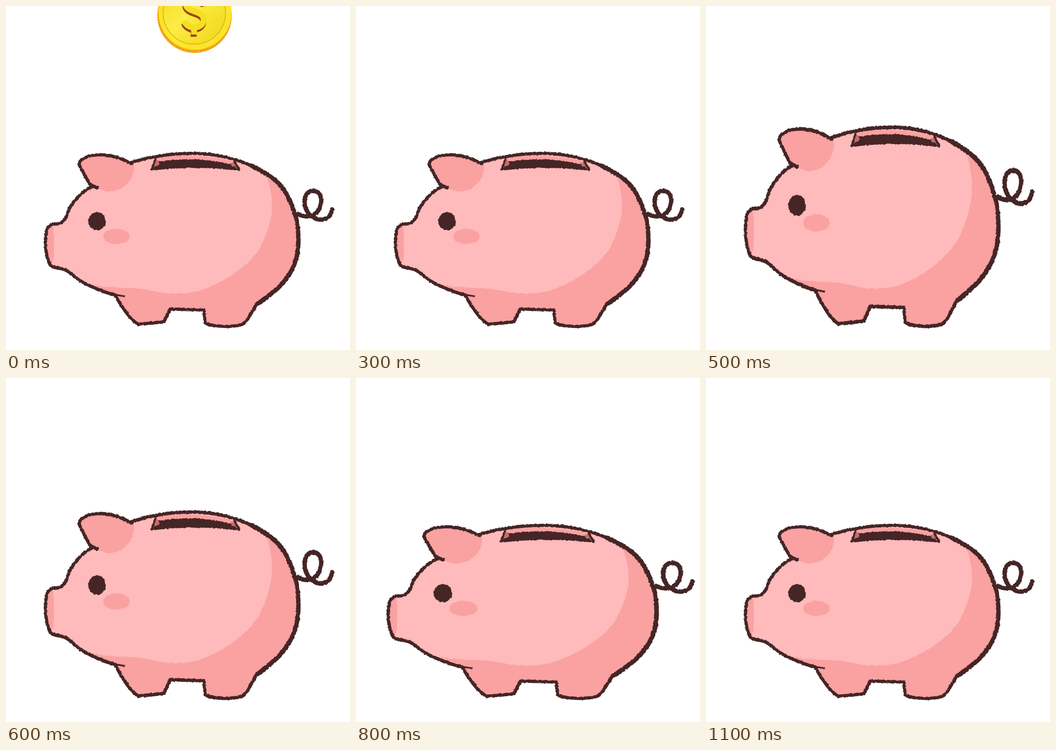
Write an HTML page that moves like this. It is 748 px wide and 748 px high and loops after 1.4 s.

```html
<!DOCTYPE html>
<html lang="en">
<head>
<meta charset="utf-8">
<title>Piggy bank</title>
<style>
  html, body { margin: 0; width: 100%; height: 100%; overflow: hidden; background: #fff; }
  svg { display: block; width: 100vw; height: 100vh; }
  .line { fill: none; stroke: #452525; stroke-width: 7; stroke-linecap: round; stroke-linejoin: round; }
  .dark { fill: #faa1a1; }
  .ink { fill: #452525; }
  .sign { fill: none; stroke-width: 13; }
</style>
</head>
<body>
<svg viewBox="0 0 748 748">
  <defs>
    <filter id="rough" filterUnits="userSpaceOnUse" x="0" y="250" width="748" height="498" color-interpolation-filters="sRGB">
      <feTurbulence type="fractalNoise" baseFrequency=".22" numOctaves="2" seed="4"/>
      <feDisplacementMap in="SourceGraphic" scale="4" xChannelSelector="R" yChannelSelector="G"/>
    </filter>
    <path id="body" d="M270 341C305 330 345 321 400 320.5C455 320 500 332 533 347C556 358 578 370 594 387C611 405 622 430 632 465C638 500 637 535 629 556C618 592 590 618 545 649C536 662 530 678 515 692C490 699 455 698 433 690L430 661L357 659L343 687L287 692C267 679 249 650 237 628L218 623C190 613 165 602 150 589C138 579 130 573 120 571C108 569 100 568 95 561C85 540 83 505 89 487C93 476 100 474 108 474C122 474 129 466 134 450C140 430 165 402 190 391"/>
    <clipPath id="inside"><use href="#body"/></clipPath>
    <clipPath id="aboveSlot"><path d="M0-200H748V352H500Q410 345 320 352H0Z"/></clipPath>
    <linearGradient id="rim" x1="0" y1="0" x2="1" y2="1">
      <stop offset="0" stop-color="#f9d71c"/><stop offset=".5" stop-color="#fdea2e"/><stop offset="1" stop-color="#f9e02a"/>
    </linearGradient>
    <linearGradient id="face" x1="0" y1="0" x2="1" y2="1">
      <stop offset="0" stop-color="#f3d81c"/><stop offset=".45" stop-color="#fcec45"/><stop offset="1" stop-color="#eed415"/>
    </linearGradient>
    <path id="dollar" d="M430-4C424-25 388-25 390-4C392 15 430 9 429 30C427 51 394 52 387 33M408-36V-18M408 46V62"/>
  </defs>

  <g id="pig"><g filter="url(#rough)">
    <use href="#body" fill="#ffbabb"/>
    <g class="dark" clip-path="url(#inside)">
      <path d="M560 360C576 385 580 420 578 448C573 482 562 508 550 530C520 572 475 598 440 612C405 626 375 627 340 624C310 617 280 613 262 613Q225 613 195 607L150 640L300 730H720V350Z"/>
      <path d="M70 470H98Q104 482 104 495V540Q104 553 97 564H70Z"/>
    </g>
    <path class="dark" d="M326 331Q405 317 498 338L495 346Q410 333 328 340Z"/>
    <path class="ink" d="M332 338Q410 326 490 344L508 358Q410 346 316 358Z"/>
    <path fill="#c66c6a" d="M327 335L333 337V346L322 349ZM488 341L496 341L501 351L491 348Z"/>
    <path class="line" style="stroke-width:5" d="M325 333L317 356M497 339L507 356"/>
    <use href="#body" class="line"/>
    <path class="line" style="stroke-width:9.5" d="M533 347C556 358 578 370 594 387C611 405 622 430 632 465C638 500 637 535 629 556C618 592 590 618 545 649"/>
    <path class="line" style="stroke-width:3.5" d="M232 627L257 631"/>
    <path class="dark" d="M198 395L183 388C175 375 163 355 159 344C160 332 178 324 205 323.5C232 323 255 333 273 343L279 346C279 380 255 403 225 403Q208 402 198 395Z"/>
    <path class="line" d="M198 395L183 388C175 375 163 355 159 344C160 332 178 324 205 323.5C232 323 255 333 273 343"/>
    <ellipse class="ink" cx="198" cy="468" rx="19" ry="19.5"/>
    <ellipse class="dark" cx="240" cy="501" rx="29" ry="16.5"/>
    <path class="line" style="stroke-width:9.5" d="M634 452C650 460 668 460 678 446C690 428 688 402 667 402C648 402 644 432 656 448C668 468 704 474 709 442"/>
  </g></g>

  <g clip-path="url(#aboveSlot)"><g id="coin">
    <ellipse cx="410" cy="21" rx="81" ry="81" fill="#f7b01a"/>
    <ellipse cx="410" cy="20" rx="79" ry="79" fill="none" stroke="#d98410" stroke-width="4" stroke-dasharray="1.5 4"/>
    <ellipse cx="411" cy="15" rx="79.5" ry="80" fill="url(#rim)"/>
    <ellipse cx="409.5" cy="15" rx="68" ry="68" fill="url(#face)" stroke="#dfb71a" stroke-width="2"/>
    <use href="#dollar" class="sign" y="5" stroke="#994a16"/>
    <use href="#dollar" class="sign" x="1" stroke="#f4df22"/>
  </g></g>
</svg>
<script>
  const STEP = 100, LOOP = 1400, GROUND = 698, FALL = 137;
  const pig = document.getElementById('pig'), coin = document.getElementById('coin');

  const tall = s => [1, s, 0, GROUND * (1 - s)];
  const wide = (s, x) => [s, 1, x, 0];
  const rest = tall(1), stretch = tall(1.077), squash = wide(1.061, -21);
  const poses = [rest, rest, rest, rest, stretch, tall(1.15), stretch,
                 rest, squash, wide(1.114, -49.5), squash];

  function draw(now) {
    const step = Math.floor(now % LOOP / STEP);
    const [sx, sy, x, y] = poses[step] || rest;
    pig.setAttribute('transform', `matrix(${sx} 0 0 ${sy} ${x} ${y})`);
    coin.setAttribute('transform', `translate(0 ${step * FALL})`);
    coin.style.display = step < 3 ? '' : 'none';
  }

  const start = performance.now();
  (function tick() {
    draw(performance.now() - start);
    requestAnimationFrame(tick);
  })();
</script>
</body>
</html>
```
